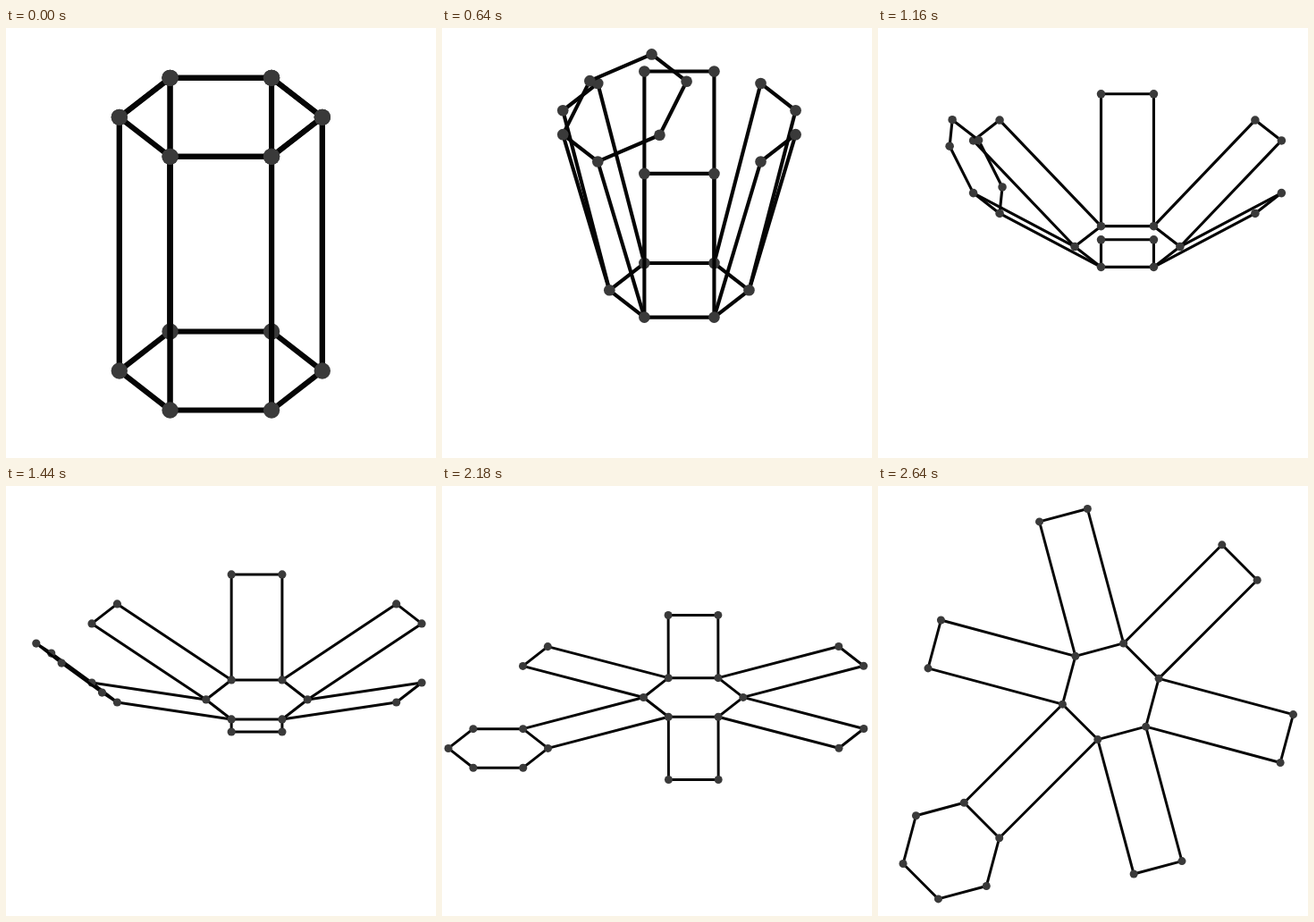
An HTML page with a canvas for the animation above (3000 ms loop, 481 px wide and 481 px high).

```html
<!DOCTYPE html>
<html lang="en">
<head>
<meta charset="utf-8">
<title>Unfolding hexagonal prism</title>
<style>
  html, body { margin: 0; width: 100%; height: 100%; overflow: hidden; background: #fff; }
  canvas { display: block; width: 100vw; height: 100vh; }
</style>
</head>
<body>
<canvas id="stage" width="481" height="481"></canvas>
<script>
const ctx = document.getElementById('stage').getContext('2d');
const LOOP = 3000, STEP = 20;
const FOLD_START = 380, FOLD_STEPS = 77;
const TURN_START = 2160, TURN_STEPS = 24;
const HEIGHT = 2.795;            // prism height, in side lengths
const CAP_SIDE = 3;              // the side that carries the lid
const RAD = Math.PI / 180;

// Opening angle of the sides: [step, degrees]
const FOLD = [[0, 0], [13, 16], [23, 29.1], [39, 52.7], [54, 69.5], [67, 81.1], [77, 90]];

const clamp = (v, lo, hi) => Math.min(hi, Math.max(lo, v));
const add = (p, q, k = 1) => p.map((v, i) => v + q[i] * k);
const stepsSince = (t, start, max) => clamp(Math.floor((t - start) / STEP), 0, max);

// Smooth curve through the table
function curve(keys, x) {
  let i = 0;
  while (i < keys.length - 2 && x > keys[i + 1][0]) i++;
  const slope = j => {
    const a = keys[Math.max(0, j - 1)], b = keys[Math.min(keys.length - 1, j + 1)];
    return (b[1] - a[1]) / (b[0] - a[0]);
  };
  const [x0, y0] = keys[i], [x1, y1] = keys[i + 1];
  const w = x1 - x0, u = (x - x0) / w, v = 1 - u;
  return v * v * (1 + 2 * u) * y0 + u * u * (3 - 2 * u) * y1
    + w * u * v * (v * slope(i) - u * slope(i + 1));
}

const corner = i => [Math.cos(i * 60 * RAD), Math.sin(i * 60 * RAD), 0];

// Points and edges of the net, sides opened by `angle`
function buildNet(angle) {
  const points = [], edges = [];
  const point = p => points.push(p) - 1;
  const edge = (a, b) => edges.push([a, b]);
  const pitched = (dir, a) => [dir[0] * Math.sin(a), dir[1] * Math.sin(a), Math.cos(a)];

  const base = [0, 1, 2, 3, 4, 5].map(i => point(corner(i)));
  base.forEach((a, i) => edge(a, base[(i + 1) % 6]));

  for (let i = 0; i < 6; i++) {
    const j = (i + 1) % 6, mid = (i * 60 + 30) * RAD;
    const out = [Math.cos(mid), Math.sin(mid), 0];
    const rise = pitched(out, angle);
    const a = point(add(corner(i), rise, HEIGHT));
    const b = point(add(corner(j), rise, HEIGHT));
    edge(base[i], a);
    edge(base[j], b);
    edge(a, b);

    if (i === CAP_SIDE) {
      const lid = pitched(out, 2 * angle - Math.PI / 2);
      const along = add(corner(j), corner(i), -1);
      const h = Math.sqrt(3) / 2;
      const at = (k, up) => point(add(add(points[a], along, k), lid, up));
      const ring = [a, at(-0.5, h), at(0, 2 * h), at(1, 2 * h), at(1.5, h), b];
      for (let k = 0; k < 5; k++) edge(ring[k], ring[k + 1]);
    }
  }
  return { points, edges };
}

function draw(t) {
  const n = stepsSince(t, FOLD_START, FOLD_STEPS);
  const u = stepsSince(t, TURN_START, TURN_STEPS) / TURN_STEPS;
  const turn = u * u * (2 - u), bow = turn * (1 - turn);

  const zoom = Math.pow(0.93, n);
  const size = 55.5 + 58 * zoom;
  const cx = 281.4 - 41.1 * zoom - 21 * turn - 11 * bow;
  const cy = 235.8 + 147.7 * zoom - 6.6 * turn + 36 * bow;
  const tilt = (26.6 + 63.4 * turn) * RAD, spin = 15 * turn * RAD;
  const sinT = Math.sin(tilt), cosT = Math.cos(tilt);
  const sinS = Math.sin(spin), cosS = Math.cos(spin);

  const { points, edges } = buildNet(curve(FOLD, n) * RAD);
  const shown = points.map(([px, py, z]) => {
    const x = px * cosS - py * sinS, y = px * sinS + py * cosS;
    return {
      x: cx + size * x,
      y: cy - size * (y * sinT + z * cosT),
      depth: z * sinT - y * cosT
    };
  });

  const parts = shown.map(p => ({ depth: p.depth + 0.02, p }));
  for (const [i, j] of edges) {
    const a = shown[i], b = shown[j];
    parts.push({ depth: Math.min(a.depth, b.depth), a, b });
  }
  parts.sort((a, b) => a.depth - b.depth);

  ctx.fillStyle = '#fff';
  ctx.fillRect(0, 0, 481, 481);
  ctx.strokeStyle = '#050505';
  ctx.fillStyle = '#3a3a3a';
  ctx.lineWidth = size * 0.053;
  ctx.lineCap = 'round';
  for (const { p, a, b } of parts) {
    ctx.beginPath();
    if (p) {
      ctx.arc(p.x, p.y, size * 0.081, 0, 2 * Math.PI);
      ctx.fill();
    } else {
      ctx.moveTo(a.x, a.y);
      ctx.lineTo(b.x, b.y);
      ctx.stroke();
    }
  }
}

const begin = performance.now();
function tick() {
  draw((performance.now() - begin) % LOOP);
  requestAnimationFrame(tick);
}
tick();
</script>
</body>
</html>
```
